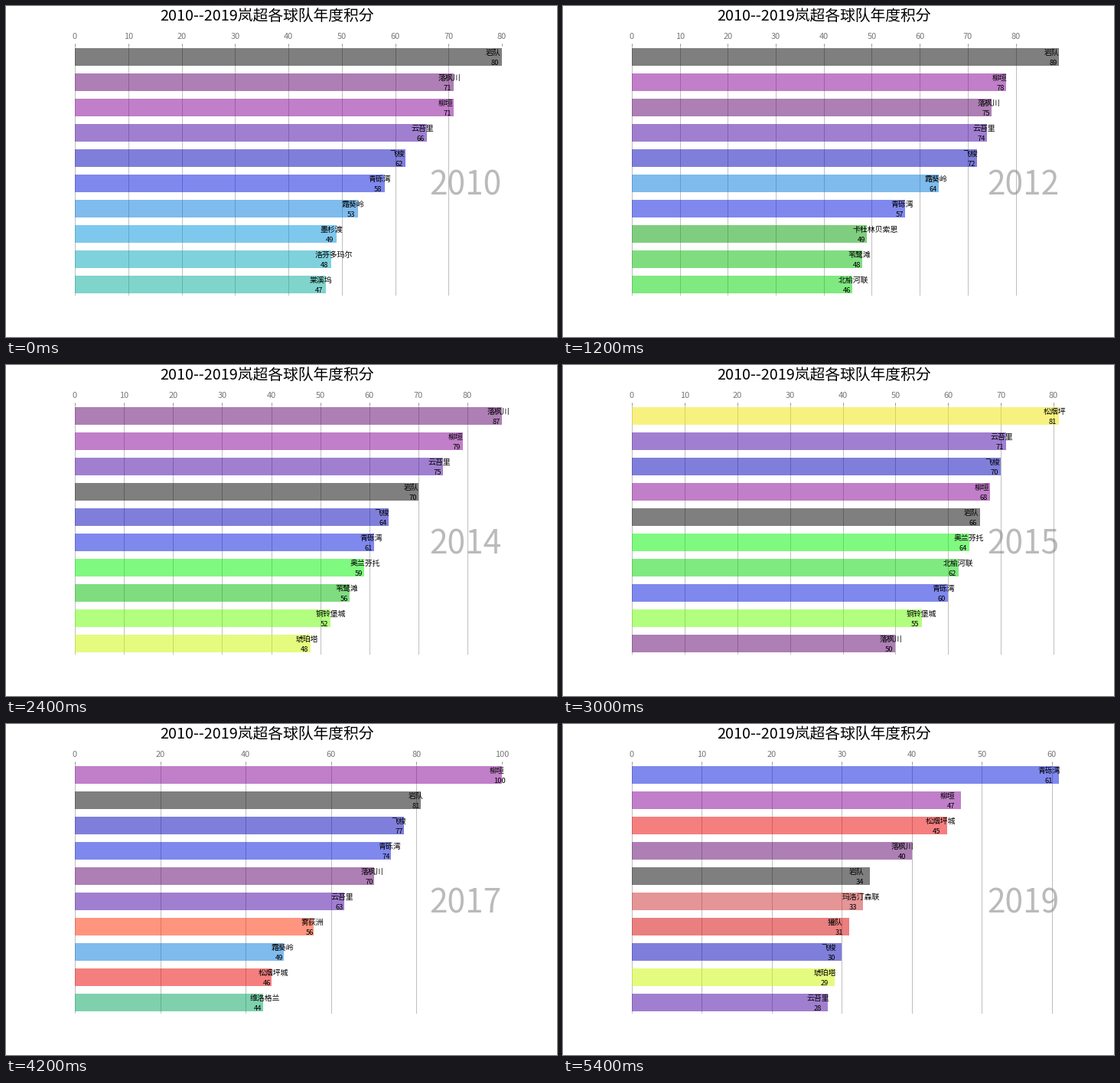
Animation of 720 by 432 pixels, one loop 6000 ms. Source, as a matplotlib script:

```python
import matplotlib.pyplot as plt
import numpy as np
from matplotlib.animation import FuncAnimation

plt.rcParams["font.family"] = "Noto Sans CJK JP"

TITLE = "2010--2019岚超各球队年度积分"
GREY = "#777777"
FIRST_YEAR = 2010
KEY_RANKS = (0, 1, 2, 4, 7, 9)

# Ranking of each season and its points at the key ranks
SEASONS = [
    ("岩队 落枫川 柳垣 云苔里 飞梭 青砾湾 霜葵岭 墨杉渡 洛芬多玛尔 棠溪坞",
     (80, 71, 71, 62, 49, 47)),
    ("柳垣 岩队 云苔里 飞梭 维洛格兰 落枫川 霜葵岭 墨杉渡 青砾湾 卡杜林贝索恩",
     (89, 89, 70, 65, 52, 47)),
    ("岩队 柳垣 落枫川 云苔里 飞梭 霜葵岭 青砾湾 卡杜林贝索恩 苇鹭滩 北榆河联",
     (89, 78, 75, 72, 49, 46)),
    ("柳垣 青砾湾 落枫川 云苔里 霜葵岭 飞梭 岩队 奥兰芬托 铜铃堡城 维洛格兰",
     (86, 84, 82, 72, 56, 49)),
    ("落枫川 柳垣 云苔里 岩队 飞梭 青砾湾 奥兰芬托 苇鹭滩 铜铃堡城 琥珀塔",
     (87, 79, 75, 64, 56, 48)),
    ("松烟坪 云苔里 飞梭 柳垣 岩队 奥兰芬托 北榆河联 青砾湾 铜铃堡城 落枫川",
     (81, 71, 70, 66, 60, 50)),
    ("落枫川 飞梭 柳垣 青砾湾 云苔里 岩队 霜葵岭 朵利维恩 奥兰芬托 雁石桥",
     (93, 86, 78, 75, 46, 45)),
    ("柳垣 岩队 飞梭 青砾湾 落枫川 云苔里 雾荻洲 霜葵岭 松烟坪城 维洛格兰",
     (100, 81, 77, 70, 49, 44)),
    ("柳垣 青砾湾 落枫川 飞梭 云苔里 岩队 獾队 霜葵岭 松烟坪城 北榆河联",
     (98, 97, 72, 70, 54, 52)),
    ("青砾湾 柳垣 松烟坪城 落枫川 岩队 玛洛汀森联 獾队 飞梭 琥珀塔 云苔里",
     (61, 47, 45, 34, 30, 28)),
]

# One colour per team, in order of first appearance
teams = list(dict.fromkeys(t for names, _ in SEASONS for t in names.split()))
cmap = plt.get_cmap("nipy_spectral")
COLORS = {t: cmap(i / len(teams)) for i, t in enumerate(teams)}

fig, ax = plt.subplots(figsize=(10, 6), dpi=72)
fig.subplots_adjust(left=0.125, right=0.9, bottom=0.125, top=0.88)


def standings(season):
    names, key_points = SEASONS[season]
    names = names.split()
    points = np.interp(range(len(names)), KEY_RANKS, key_points)
    return names, points.round().astype(int)


def style_axes(top):
    ax.xaxis.tick_top()
    ax.tick_params(axis="x", colors=GREY, labelsize=11, pad=3)
    ax.set_yticks([])
    ax.margins(0, 0.01)
    ax.set_xlim(0, top)
    ax.grid(axis="x", linestyle="-")
    ax.set_axisbelow(True)
    ax.set_frame_on(False)


def draw(frame):
    names, points = standings(frame)
    rows = range(len(names) - 1, -1, -1)

    ax.clear()
    ax.barh(rows, points, height=0.7, alpha=0.5,
            color=[COLORS[n] for n in names])
    for row, name, value in zip(rows, names, points):
        ax.text(value - 3, row + 0.08, name, size=9.9)
        ax.text(value - 2, row - 0.32, value, size=9.4)

    ax.text(0.2, 1.1, TITLE, transform=ax.transAxes, size=19.8)
    ax.text(1, 0.403, FIRST_YEAR + frame, transform=ax.transAxes, size=42.4,
            ha="right", color=GREY, alpha=0.5)
    style_axes(points[0])


anim = FuncAnimation(fig, draw, frames=len(SEASONS), interval=600,
                     init_func=lambda: None, repeat=True, repeat_delay=0)
plt.show()
```
